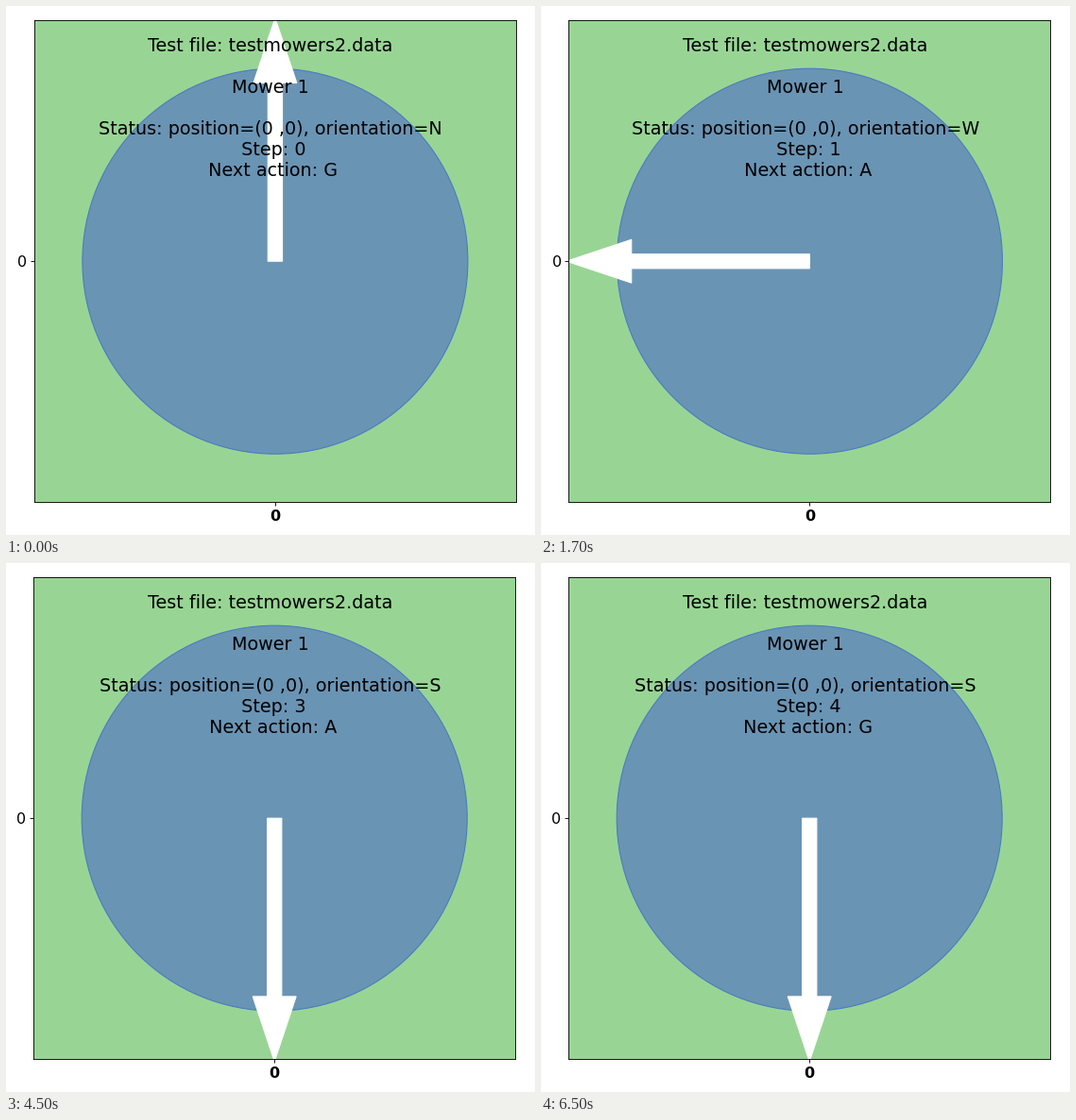
A matplotlib script for the animation above (8 s loop, 560 by 560 pixels).

```python
import matplotlib.pyplot as plt
from matplotlib.animation import FuncAnimation
from matplotlib.patches import Circle, FancyArrow

SIZE, DPI = 560, 80
SIDE, BOTTOM = 510, 34.8
REACH = 0.37
FRAME_MS, FRAMES = 500, 16
HEADINGS = {"N": (0, 1), "W": (-1, 0), "S": (0, -1)}

# start time in ms, heading, next action, left edge of the lawn in pixels
STEPS = [
    (0, "N", "G", 29.9),
    (500, "W", "A", 29.45),
    (2500, "W", "G", 29.2),
    (4500, "S", "A", 29.2),
    (6500, "S", "G", 29.2),
]

plt.rcParams.update({"font.family": "DejaVu Sans", "font.size": 12})
fig = plt.figure(figsize=(SIZE / DPI, SIZE / DPI), dpi=DPI, facecolor="white")
ax = fig.add_axes([0, 0, 1, 1])
title = fig.text(0.5, 0.98, "", fontsize="x-large", ha="center", va="top", zorder=10)


def draw_lawn(left):
    ax.clear()
    ax.set_position([left / SIZE, BOTTOM / SIZE, SIDE / SIZE, SIDE / SIZE])
    ax.set(xlim=(-0.5, 0.5), ylim=(-0.5, 0.5), facecolor="#98d594")
    ax.set_xticks([0], ["0"], fontsize="large", fontweight="bold")
    ax.set_yticks([0], ["0"], fontsize="large")


def draw_mower(heading):
    dx, dy = HEADINGS[heading]
    ax.add_patch(Circle((0, 0), 0.4, facecolor="#6a94b4", edgecolor="#4a7cc0", lw=1))
    ax.add_patch(FancyArrow(0, 0, REACH * dx, REACH * dy, width=0.03,
                            head_width=0.09, head_length=0.135, color="white", lw=1))


def update(frame):
    now = frame * FRAME_MS
    step = max(i for i, s in enumerate(STEPS) if s[0] <= now)
    _, heading, action, left = STEPS[step]
    draw_lawn(left)
    draw_mower(heading)
    title.set_text(
        "\nTest file: testmowers2.data\n\nMower 1\n\n"
        f"Status: position=(0 ,0), orientation={heading}\n"
        f" Step: {step}\n Next action: {action}"
    )
    return []


anim = FuncAnimation(fig, update, frames=FRAMES, interval=FRAME_MS,
                     init_func=lambda: [], repeat=True, repeat_delay=0)
plt.show()
```
